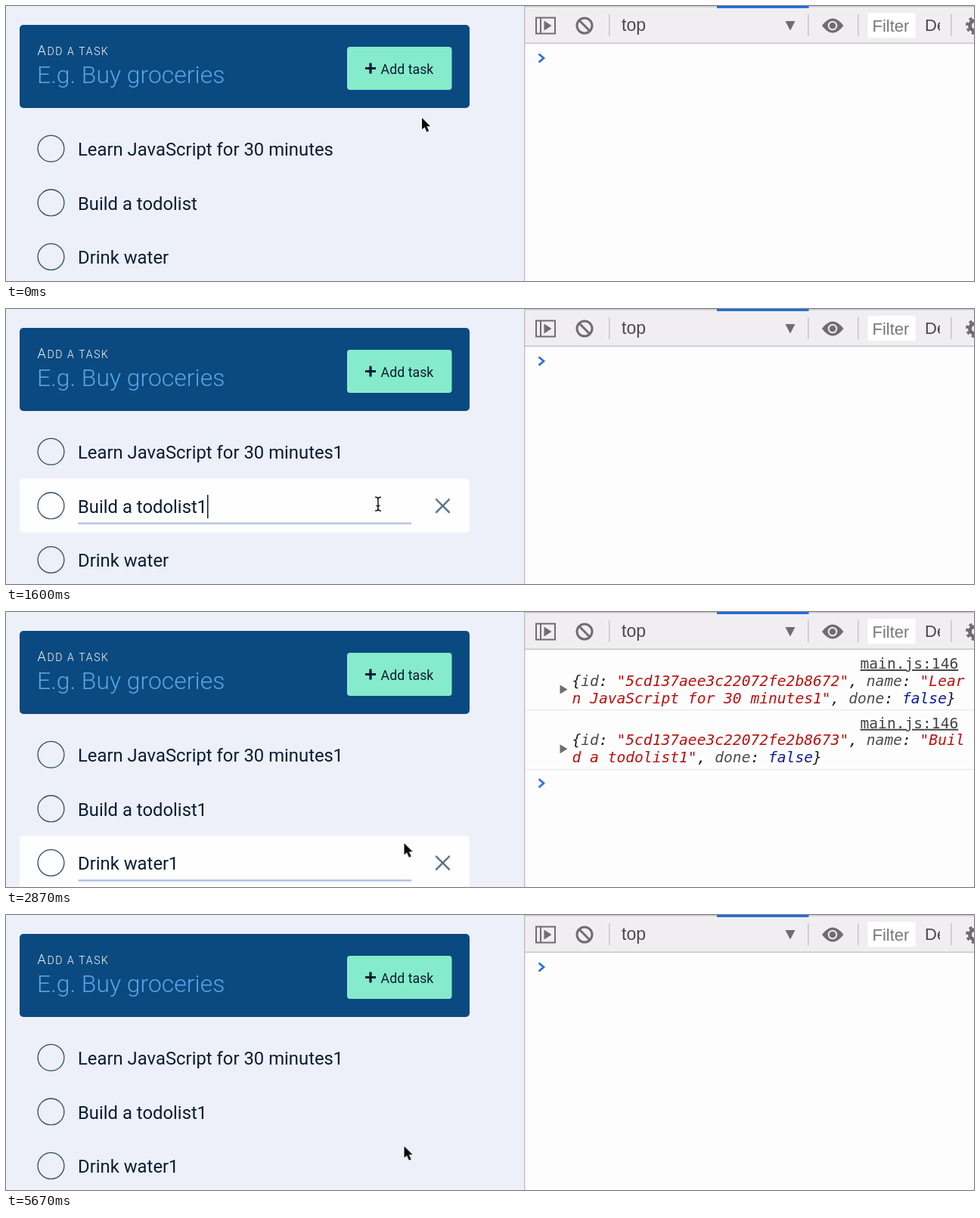
Animation of 1280 by 364 pixels, one loop 5.74 s. Source, as an HTML page:

```html
<!DOCTYPE html>
<html lang="en">
<head>
<meta charset="utf-8">
<title>Todolist with autosave</title>
<style>
html, body { margin: 0; width: 100%; height: 100%; overflow: hidden; background: #edf0f8; }
svg { display: block; width: 100%; height: 100%; }
text { white-space: pre; }

.app { font-family: Roboto, sans-serif; font-size: 23.85px; fill: #0a1c33; }
.label { font-size: 18px; font-weight: 300; letter-spacing: 1.65px; fill: #fff; }
.label tspan { font-size: 14px; }
.hint { font-size: 31.9px; font-weight: 300; fill: #58a4e4; }
.button { font-size: 17.8px; }
.check { fill: none; stroke: #2f4d64; stroke-width: 1.3; }
.card { fill: #fefdff; }
.cross { stroke: #506a84; stroke-width: 2.3; }
.line { fill: #afbedd; }

.bar { font-family: "Liberation Sans", Arial, sans-serif; font-size: 22px; fill: #6e6e6e; }
.sep { fill: #c9c9cb; }
.prompt { fill: none; stroke: #2a6fdc; stroke-width: 2.7; }
.log { font: italic 19.6px "DejaVu Sans Mono", monospace; fill: #1b1b1b; }
.link { font-style: normal; fill: #444; text-decoration: underline; }
.key { fill: #4b4b4b; }
.str { fill: #b8120f; }
.bool { fill: #0d1d9c; }

/* Everything timed shares one 5740 ms clock. */
.timed { opacity: 0; animation: 5740ms step-end infinite; }
.shown { opacity: 1; }
@keyframes list { 71.9% { opacity: 0 } 81.3% { opacity: 1 } }
@keyframes fetch { 71.9% { opacity: 1 } 81.3% { opacity: 0 } }
@keyframes hover1 { 2.2% { opacity: 1 } 18.5% { opacity: 0 } }
@keyframes hover2 { 18.5% { opacity: 1 } 29.8% { opacity: 0 } }
@keyframes hover3 { 29.8% { opacity: 1 } 71.9% { opacity: 0 } }
@keyframes focus1 { 6.9% { opacity: 1 } 22% { opacity: 0 } }
@keyframes focus2 { 22% { opacity: 1 } 32.5% { opacity: 0 } }
@keyframes focus3 { 32.5% { opacity: 1 } 71.9% { opacity: 0 } }
@keyframes typed1 { 16.1%, 99.99% { opacity: 1 } }
@keyframes typed2 { 26.6%, 99.99% { opacity: 1 } }
@keyframes typed3 { 38.2%, 99.99% { opacity: 1 } }
@keyframes log1 { 34.8% { opacity: 1 } 71.9% { opacity: 0 } }
@keyframes log2 { 45.2% { opacity: 1 } 71.9% { opacity: 0 } }
@keyframes log3 { 56.9% { opacity: 1 } 71.9% { opacity: 0 } }
@keyframes prompt {
  34.8% { transform: translateY(78.7px) }
  45.2% { transform: translateY(157.6px) }
  56.9% { transform: translateY(236.3px) }
  71.9% { transform: none }
}
@keyframes caret {
  6.9% { opacity: 1; transform: translate(433.5px, 174px) }
  15.6% { opacity: 0; transform: translate(433.5px, 174px) }
  16.1% { opacity: 1; transform: translate(446px, 174px) }
  22% { opacity: 1; transform: translate(253.5px, 245.5px) }
  26.6% { opacity: 1; transform: translate(266px, 245.5px) }
  32.5% { opacity: 1; transform: translate(216px, 317px) }
  38.2% { opacity: 1; transform: translate(229px, 317px) }
  46.9% { opacity: 0; transform: translate(229px, 317px) }
  55.6% { opacity: 1; transform: translate(229px, 317px) }
  64.3% { opacity: 0; transform: translate(229px, 317px) }
}
@keyframes ring {
  6.9% { opacity: 1 } 9.2% { opacity: 0 }
  22% { opacity: 1 } 24.3% { opacity: 0 }
  32.5% { opacity: 1 } 34.8% { opacity: 0 }
}
@keyframes beam {
  3.6% { opacity: 1 } 17.8% { opacity: 0 }
  19.4% { opacity: 1 } 29.2% { opacity: 0 }
  30.5% { opacity: 1 } 43.2% { opacity: 0 }
}
@keyframes arrow {
  3.6% { opacity: 0 } 17.8% { opacity: 1 }
  19.4% { opacity: 0 } 29.2% { opacity: 1 }
  30.5% { opacity: 0 } 43.2% { opacity: 1 }
}
.pointer { animation: move 5740ms linear infinite; }
@keyframes move {
  0%, 0.9% { transform: translate(550px, 148px); animation-timing-function: ease-in-out }
  5.8%, 16.6% { transform: translate(505px, 186px) }
  19.7% { transform: translate(501px, 243px); animation-timing-function: ease-out }
  21.9%, 27.8% { transform: translate(492px, 258px); animation-timing-function: ease-in-out }
  31.5%, 39.5% { transform: translate(486.5px, 327.5px); animation-timing-function: ease-in-out }
  44.2%, 100% { transform: translate(526.5px, 306px) }
}
</style>
</head>
<body>
<svg viewBox="0 0 1280 364" xmlns="http://www.w3.org/2000/svg">
  <defs>
    <g id="hover">
      <rect class="card" x="18" y="152.7" width="595" height="71.5" rx="5"/>
      <path class="cross" d="M568.3 179.7l18.4 18.4m0-18.4l-18.4 18.4"/>
    </g>
    <circle id="check" class="check" cx="59.5" cy="188.8" r="17.4"/>
    <rect id="line" class="line" x="95.5" y="211" width="440.5" height="2.3"/>
    <g id="entry">
      <text class="link" x="1129.5" y="75">main.js:146</text>
      <path d="M732.5 96.5v12l10-6z" fill="#6e6e6e"/>
      <rect x="686" y="128.8" width="594" height="1.6" fill="#ebeaec"/>
    </g>
    <clipPath id="cut"><rect x="1210" y="0" width="25" height="49"/></clipPath>
  </defs>

  <rect width="1280" height="364" fill="#edf0f8"/>

  <g class="app">
    <rect x="18" y="25" width="595" height="110" rx="5" fill="#0a4a80"/>
    <text class="label" x="41.5" y="65">A<tspan>DD A TASK</tspan></text>
    <text class="hint" x="41" y="102">E.g. Buy groceries</text>
    <rect x="451" y="54" width="138.5" height="57" rx="4" fill="#86ebca"/>
    <path d="M482 75.5v14m-7-7h14" stroke="#0a1c33" stroke-width="3.2"/>
    <text class="button" x="495.6" y="89.5">Add task</text>

    <g class="timed shown" style="animation-name:list">
      <use href="#hover" class="timed" style="animation-name:hover1"/>
      <use href="#check"/>
      <text x="95" y="198">Learn JavaScript for 30 minutes</text>
      <text x="432.6" y="198" class="timed" style="animation-name:typed1">1</text>
      <use href="#line" class="timed" style="animation-name:focus1"/>

      <g transform="translate(0 71.6)">
        <use href="#hover" class="timed" style="animation-name:hover2"/>
        <use href="#check"/>
        <text x="95" y="198">Build a todolist</text>
        <text x="252.6" y="198" class="timed" style="animation-name:typed2">1</text>
        <use href="#line" class="timed" style="animation-name:focus2"/>
      </g>

      <g transform="translate(0 143.2)">
        <use href="#hover" class="timed" style="animation-name:hover3"/>
        <use href="#check"/>
        <text x="95" y="198">Drink water</text>
        <text x="214.8" y="198" class="timed" style="animation-name:typed3">1</text>
        <use href="#line" class="timed" style="animation-name:focus3"/>
      </g>
      <rect class="timed" style="animation-name:caret" width="1.5" height="31"/>
    </g>

    <g class="timed" style="animation-name:fetch">
      <text x="40.5" y="191">Fetching your tasks... Please wait a bit...</text>
      <text x="497.5" y="191">.</text>
      <g fill="none" stroke-linecap="round">
        <path d="M476 190l-2.500 3M489.500 190l2.500 3" stroke="#8d2b22" stroke-width="2.500"/>
        <path d="M473 174.500q1-4 5.500-3.500M492 174.500q-1-4-5.500-3.500" stroke="#c9402f" stroke-width="4"/>
        <path d="M482.500 170v3" stroke="#8a7a74" stroke-width="2"/>
        <circle cx="482.500" cy="182" r="9.300" fill="#f8f3ee" stroke="#c63d2d" stroke-width="2.600"/>
        <circle cx="482.500" cy="182" r="6.500" stroke="#8a8580" stroke-width="1" stroke-dasharray=".1 3.300"/>
        <path d="M478.500 179.500l4 2.500 3.800-4.500" stroke="#333" stroke-width="1.300"/>
      </g>
    </g>
  </g>

  <rect x="685" width="595" height="364" fill="#fefdfe"/>
  <g class="bar">
    <rect x="685" width="595" height="49" fill="#f0eef0"/>
    <rect x="685" width="595" height="1.5" fill="#cbcacc"/>
    <rect x="685" y="48.5" width="595" height="1.6" fill="#c9c8ca"/>
    <rect x="685" width="1.4" height="364" fill="#bfbfc2"/>
    <rect x="940" width="121.500" height="2.800" fill="#1a67dd"/>

    <path d="M701 15.500h25v21h-25zM707 15.500v21" fill="none" stroke="#6e6e6e" stroke-width="2"/>
    <path d="M711.500 19.500v13l10-6.500z"/>
    <path d="M757.800 18.800l14.400 14.400" stroke="#6e6e6e" stroke-width="3"/>
    <circle cx="765" cy="26" r="10" fill="none" stroke="#6e6e6e" stroke-width="3"/>
    <rect class="sep" x="797" y="11" width="1.600" height="29"/>
    <text x="814" y="33" font-size="23" fill="#4a4a4a">top</text>
    <path d="M1030.500 20h13l-6.500 12.500z"/>
    <rect class="sep" x="1060" y="11" width="1.600" height="29"/>
    <path d="M1079 26q14-19 28.500 0q-14.500 19-28.500 0z"/>
    <circle cx="1093" cy="26" r="5.300" fill="#6e6e6e" stroke="#f0eef0" stroke-width="2"/>
    <rect class="sep" x="1126" y="11" width="1.600" height="29"/>
    <rect x="1139.500" y="9" width="63" height="33" fill="#fff"/>
    <text x="1145.500" y="34" fill="#777">Filter</text>
    <text x="1215" y="33" fill="#4a4a4a" clip-path="url(#cut)">De</text>
    <rect class="sep" x="1249" y="11" width="1.600" height="29"/>
    <g fill="none" stroke="#6e6e6e">
      <circle cx="1281" cy="26" r="6.500" stroke-width="5"/>
      <circle cx="1281" cy="26" r="10" stroke-width="4" stroke-dasharray="3.930"/>
    </g>
  </g>

  <g class="log">
    <g class="timed" style="animation-name:log1">
      <use href="#entry"/>
      <text x="748.500" y="97.500">{<tspan class="key">id</tspan>: <tspan class="str">"5cd137aee3c22072fe2b8672"</tspan>, <tspan class="key">name</tspan>: <tspan class="str">"Lear</tspan></text>
      <text x="748.500" y="120.500"><tspan class="str">n JavaScript for 30 minutes1"</tspan>, <tspan class="key">done</tspan>: <tspan class="bool">false</tspan>}</text>
    </g>
    <g transform="translate(0 78.800)"><g class="timed" style="animation-name:log2">
      <use href="#entry"/>
      <text x="748.500" y="97.500">{<tspan class="key">id</tspan>: <tspan class="str">"5cd137aee3c22072fe2b8673"</tspan>, <tspan class="key">name</tspan>: <tspan class="str">"Buil</tspan></text>
      <text x="748.500" y="120.500"><tspan class="str">d a todolist1"</tspan>, <tspan class="key">done</tspan>: <tspan class="bool">false</tspan>}</text>
    </g></g>
    <g transform="translate(0 157.500)"><g class="timed" style="animation-name:log3">
      <use href="#entry"/>
      <text x="748.500" y="97.500">{<tspan class="key">id</tspan>: <tspan class="str">"5cd137aee3c22072fe2b8674"</tspan>, <tspan class="key">name</tspan>: <tspan class="str">"Drin</tspan></text>
      <text x="748.500" y="120.500"><tspan class="str">k water1"</tspan>, <tspan class="key">done</tspan>: <tspan class="bool">false</tspan>}</text>
    </g></g>
    <path class="prompt timed shown" style="animation-name:prompt" d="M704.500 63.500l6.500 5.500-6.500 5.500"/>
  </g>

  <g class="pointer">
    <circle class="timed" style="animation-name:ring" r="19.800" fill="#fefdff" stroke="#111" stroke-width="1.800"/>
    <g class="timed" style="animation-name:beam" fill="none" stroke-linecap="round">
      <path id="beam" d="M-3.500-9q3.500 0 3.500 2.500v13q0 2.500-3.500 2.500M3.500-9q-3.500 0-3.500 2.500M3.500 9q-3.500 0-3.500-2.500M-2 2.500h4" stroke="#fff" stroke-width="3.500"/>
      <path d="M-3.500-9q3.500 0 3.500 2.500v13q0 2.500-3.500 2.500M3.500-9q-3.500 0-3.500 2.500M3.500 9q-3.500 0-3.500-2.500M-2 2.500h4" stroke="#111" stroke-width="1.500"/>
    </g>
    <path class="timed shown" style="animation-name:arrow" d="M0 0v15.500l3.600-3.300 2.800 6.500 2.800-1.200-2.800-6.300h4.800z" fill="#0a0a0a" stroke="#fff" stroke-width="1.600" paint-order="stroke"/>
  </g>
</svg>
</body>
</html>
```
